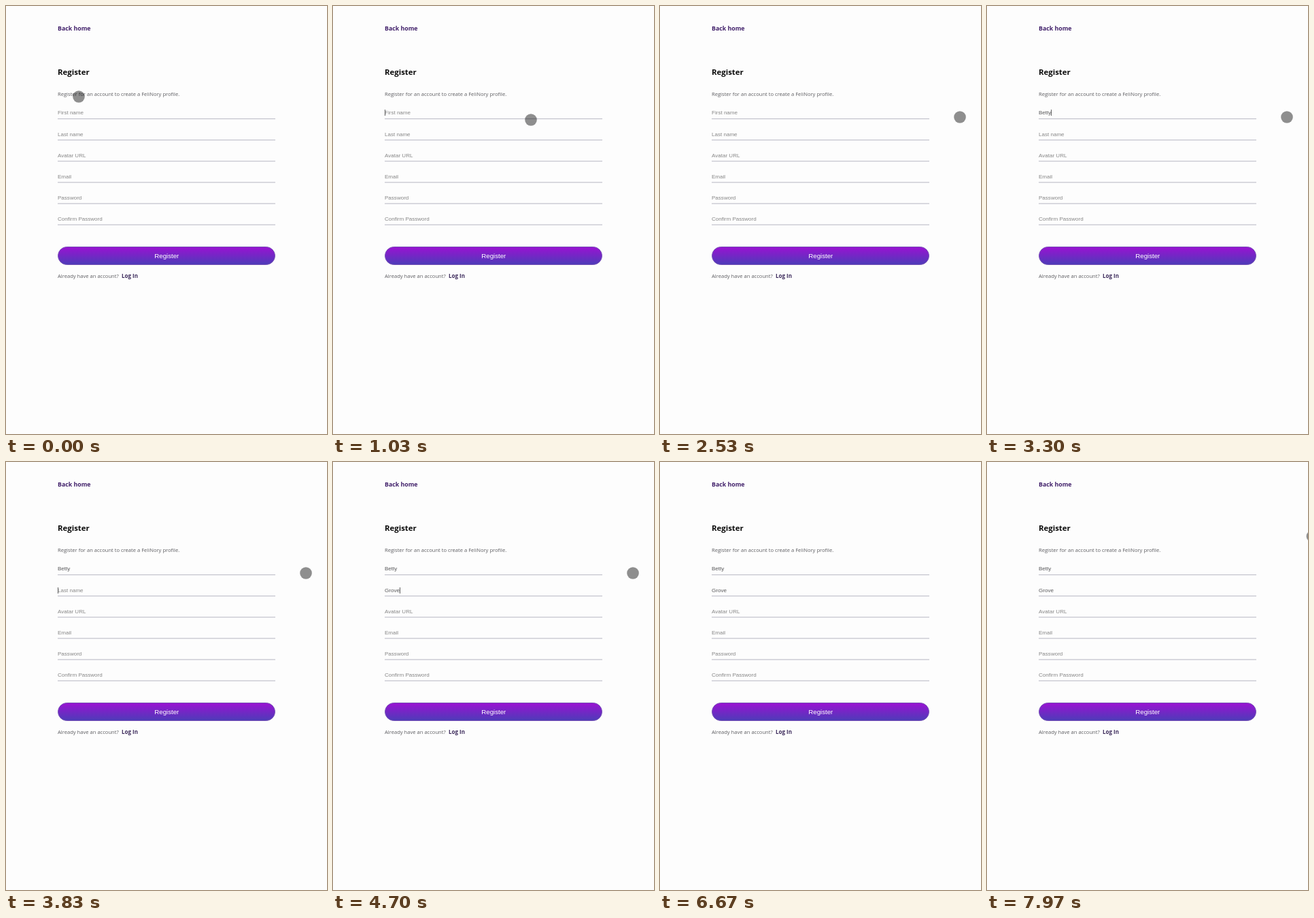
Recreate the animation shown at these times as an HTML page. Size 472x628 px, loop 8000 ms.

```html
<!DOCTYPE html>
<html lang="en">
<head>
<meta charset="utf-8">
<title>Register</title>
<style>
  html, body { margin: 0; width: 100%; height: 100%; overflow: hidden; background: #fdfdfd; }
  svg { display: block; width: 472px; height: 628px; }
  text { white-space: pre; }
  .ui { font: 7.6px "Open Sans", "Noto Sans", sans-serif; fill: #5e5e62; }
  .bold { font-weight: 700; }
  .field { font: 8.05px "Liberation Sans", Arial, sans-serif; fill: #868686; }
  .filled { fill: #58585a; }
  .label { font: 9.7px "Liberation Sans", Arial, sans-serif; fill: #fff; text-anchor: middle; }
</style>
</head>
<body>
<svg viewBox="0 0 472 628">
  <defs>
    <linearGradient id="violet" x1="0" y1="0" x2="0" y2="1">
      <stop offset="0" stop-color="#9a12d2"/>
      <stop offset="1" stop-color="#4d3cb8"/>
    </linearGradient>
  </defs>
  <text class="ui bold" x="76" y="36" style="font-size:8.8px;fill:#41206a">Back home</text>
  <text class="ui bold" x="76" y="101" style="font-size:11.4px;fill:#0a0a0a">Register</text>
  <text class="ui" x="76" y="132">Register for an account to create a FeliNory profile.</text>
  <g id="form"></g>
  <rect x="76.5" y="353.5" width="319" height="26" rx="13" fill="url(#violet)" stroke="#7450b4"/>
  <text class="label" x="236.3" y="370">Register</text>
  <text class="ui" x="76" y="399">Already have an account?</text>
  <text class="ui bold" x="170" y="399" style="font-size:8px;fill:#3d2b5c">Log In</text>
  <rect id="caret" width="1" height="9" fill="#606060"/>
  <circle id="pointer" r="8.8" fill="#000" fill-opacity=".44"/>
</svg>
<script>
const LOOP = 8000, LEFT = 76, BLINK = 530;
const $ = id => document.getElementById(id);
const form = $('form'), caret = $('caret'), pointer = $('pointer');

const labels = ['First name', 'Last name', 'Avatar URL', 'Email', 'Password', 'Confirm Password'];
// Typed fields: focus time and the time of each key
const entries = [
  { word: 'Betty', focus: 640, keys: [2620, 2790, 2950, 3110, 3260] },
  { word: 'Grove', focus: 3560, keys: [3860, 4030, 4190, 4350, 4500] }
];
const BLUR = 5030;

// Pointer stops: time, x, y
const path = [
  [230, 107, 133], [640, 276, 158], [1000, 291, 167],
  [1070, 291, 167], [1740, 441, 163], [BLUR, 441, 163],
  [7730, 540, 109], [7970, 478.5, 109], [8000, 474, 109]
];

function add(name, attrs) {
  const el = document.createElementNS('http://www.w3.org/2000/svg', name);
  for (const key in attrs) el.setAttribute(key, attrs[key]);
  return form.appendChild(el);
}

const baseline = i => Math.round(159.4 + 31.2 * i);

const rows = labels.map((label, i) => {
  add('rect', { x: LEFT, y: 164.9 + 31.1 * i, width: 320, height: 1.2, fill: '#c2c2cc' });
  const text = add('text', { class: 'field', x: LEFT, y: baseline(i) });
  text.textContent = label;
  return text;
});

function pointerAt(t) {
  if (t <= path[0][0]) return path[0].slice(1);
  const n = path.findIndex(stop => stop[0] >= t);
  const [t0, x0, y0] = path[n - 1], [t1, x1, y1] = path[n];
  const p = (t - t0) / (t1 - t0);
  const k = t < BLUR ? p * p * (3 - 2 * p) : p;
  return [x0 + (x1 - x0) * k, y0 + (y1 - y0) * k];
}

function show(el, on) { el.setAttribute('visibility', on ? 'visible' : 'hidden'); }

function draw(t) {
  let active = -1, since = 0;
  entries.forEach(({ word, focus, keys }, i) => {
    const done = keys.filter(k => k <= t);
    const value = word.slice(0, done.length) || labels[i];
    if (rows[i].textContent !== value) rows[i].textContent = value;
    rows[i].classList.toggle('filled', done.length > 0);
    if (t >= focus) {
      active = i;
      since = done.length ? done[done.length - 1] : focus;
    }
  });

  const on = active >= 0 && t < BLUR && Math.floor((t - since) / BLINK) % 2 === 0;
  show(caret, on);
  if (on) {
    const typed = rows[active].classList.contains('filled');
    const width = typed ? rows[active].getComputedTextLength() : 0;
    caret.setAttribute('x', Math.round(LEFT + width - 0.3));
    caret.setAttribute('y', baseline(active) - 7);
  }

  const [x, y] = pointerAt(t);
  pointer.setAttribute('cx', x);
  pointer.setAttribute('cy', y);
  show(pointer, t < BLUR || t >= 7730);
}

function tick() {
  draw(performance.now() % LOOP);
  requestAnimationFrame(tick);
}
tick();
</script>
</body>
</html>
```
